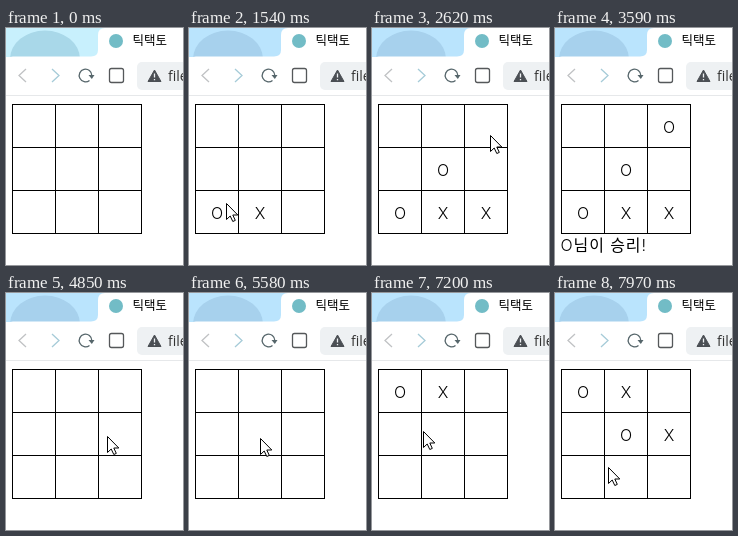
An HTML page that plays this animation: 177x237 px, repeating every 8000 ms.

```html
<!DOCTYPE html>
<html lang="ko">
<head>
<meta charset="utf-8">
<title>틱택토</title>
<style>
  html, body { margin: 0; width: 100%; height: 100%; overflow: hidden; background: #fff; }
  svg { display: block; }
  text { font-family: "Noto Sans CJK KR", "Noto Sans CJK", "Noto Sans", sans-serif; }
  .page { font-family: Inter, "Noto Sans CJK KR", "Noto Sans CJK", sans-serif; font-size: 16px; font-weight: 300; }
  .mark { text-anchor: middle; }
  .icon { fill: none; stroke-width: 1.3; }
</style>
</head>
<body>
<svg width="177" height="237" viewBox="0 0 177 237">
  <!-- tab strip -->
  <rect id="sky" width="100" height="29"/>
  <ellipse id="dome" cx="39" cy="31" rx="35" ry="28.5"/>
  <path d="M0 36V35Q0 28.500 7 28.500H85Q92 28.500 92 22V7Q92 0 99 0H177V237H0Z" fill="#fff"/>
  <circle cx="110" cy="13" r="7" fill="#72bcc6"/>
  <text x="126.500" y="17" font-size="12.500">틱택토</text>

  <!-- toolbar -->
  <path class="icon" d="M20 41L13 47.500L20 54" stroke="#c0c2c4"/>
  <path class="icon" d="M46 41L53 47.500L46 54" stroke="#a6cbd8"/>
  <path class="icon" d="M83.500 52.400A6.300 6.300 0 1 1 85.800 47.500" stroke="#56666b"/>
  <path d="M82.500 47H88.500L85.800 51Z" fill="#56666b"/>
  <rect class="icon" x="103.500" y="40.500" width="14" height="14" rx="2" stroke="#55585a"/>
  <rect x="131" y="34" width="60" height="28" rx="5" fill="#eef1f3"/>
  <path d="M148.500 42L155 53.500H142Z" fill="#4b4f54" stroke="#4b4f54" stroke-linejoin="round"/>
  <path d="M148.500 45.500V49.500M148.500 51V52.300" stroke="#eef1f3" stroke-width="1.300"/>
  <text x="162" y="53" font-size="14" fill="#333" style="font-family:'Open Sans',sans-serif">file</text>
  <path d="M0 67.500H177" stroke="#e6e8ea"/>

  <!-- page -->
  <g id="board" stroke="#000" shape-rendering="crispEdges"></g>
  <g id="marks"></g>
  <text id="result" class="page" x="5.500" y="222.500" letter-spacing="0.9">O님이 승리!</text>

  <g id="cursor">
    <circle id="press" r="12" fill="#fbf984" style="mix-blend-mode:multiply"/>
    <path d="M.500 .500V16.500L4.200 13L6.800 18.500L9.300 17.400L6.800 12H11.800Z" fill="#fff" stroke="#000" stroke-linejoin="round"/>
  </g>
</svg>
<script>
const LOOP = 8000;
const RESET = 4850;
const PRESS = 90;
const CELL = 43;
const $ = id => document.getElementById(id);

// Pointer moves: start, duration, destination
const moves = [
  [560, 280, 22, 179], [1510, 30, 37, 175], [1540, 180, 64, 150],
  [2190, 390, 118, 107], [3300, 290, 180, 205], [4049, 1, 147, 159],
  [4050, 470, 101, 143], [5350, 230, 71, 145], [5780, 340, 34, 102],
  [6330, 190, 34, 138], [7110, 260, 72, 138], [7680, 290, 53, 174]
];

// Turns: press time, then the cells of O and X, counted row by row
const turns = [[1070, 6, 7], [1900, 4, 8], [2680, 2], [6190, 0, 1], [7440, 4, 5]];
const winTime = turns[2][0] + PRESS;

function add(parent, tag, attrs, text = "") {
  const el = document.createElementNS("http://www.w3.org/2000/svg", tag);
  for (const name in attrs) el.setAttribute(name, attrs[name]);
  el.textContent = text;
  parent.append(el);
  return el;
}

for (let i = 0; i < 4; i++) {
  const x = 6.5 + i * CELL;
  const y = 76.5 + i * CELL;
  add($("board"), "path", { d: `M${x} 76V206M6 ${y}H136` });
}

const marks = turns.flatMap(([time, ...cells]) => cells.map((cell, i) => ({
  from: time + PRESS,
  to: time < RESET ? RESET : LOOP,
  el: add($("marks"), "text", {
    class: "page mark",
    x: 28 + cell % 3 * CELL,
    y: 105 + Math.floor(cell / 3) * CELL
  }, "OX"[i])
})));

const within = (t, from, to) => t >= from && t < to;
const show = (el, on) => { el.style.visibility = on ? "visible" : "hidden"; };

function tipAt(t) {
  let x = 62, y = 240;
  for (const [start, span, toX, toY] of moves) {
    const p = Math.min(1, Math.max(0, (t - start) / span));
    const k = p * (1.4 - 0.4 * p);
    x += (toX - x) * k;
    y += (toY - y) * k;
  }
  return [Math.round(x), Math.round(y)];
}

function draw(t) {
  const early = t < turns[0][0];
  $("sky").setAttribute("fill", early ? "#c8f0fd" : "#bae4fd");
  $("dome").setAttribute("fill", early ? "#a9d8e9" : "#a7d1ed");
  marks.forEach(m => show(m.el, within(t, m.from, m.to)));
  show($("result"), within(t, winTime, RESET));
  show($("press"), turns.some(([time]) => within(t, time, time + PRESS)));
  $("cursor").setAttribute("transform", `translate(${tipAt(t)})`);
}

const start = performance.now();
function tick() {
  draw((performance.now() - start) % LOOP);
  requestAnimationFrame(tick);
}
tick();
</script>
</body>
</html>
```
